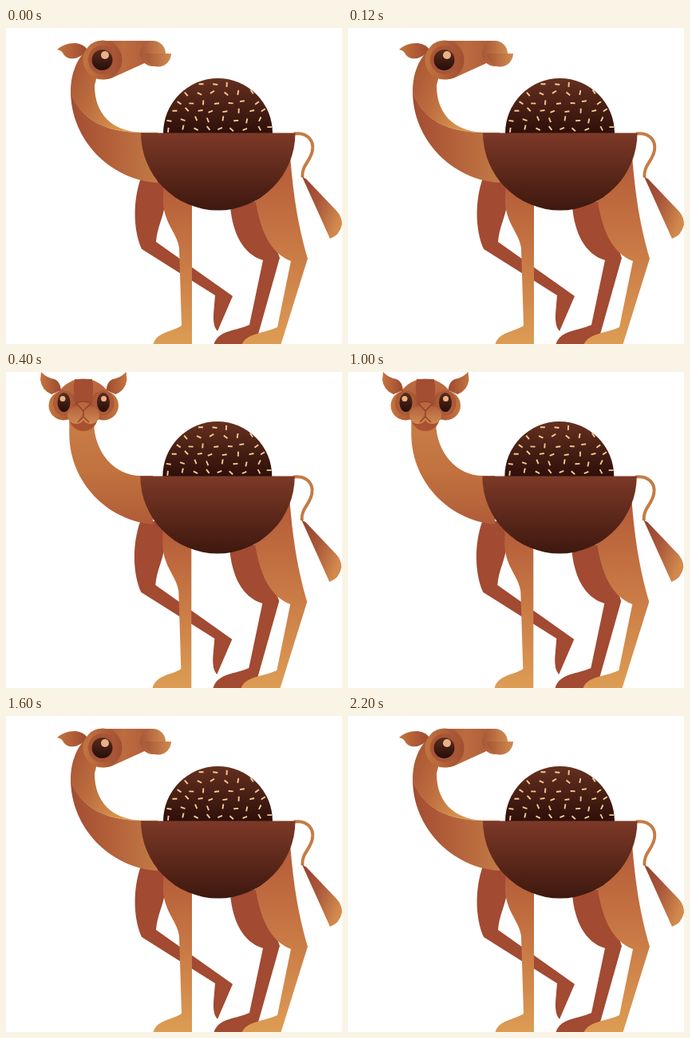
An HTML page that plays this animation: 421x396 px, repeating every 2.6 s.

```html
<!DOCTYPE html>
<html lang="en">
<head>
<meta charset="utf-8">
<title>Camel</title>
<style>
  html, body { margin: 0; width: 100%; height: 100%; overflow: hidden; background: #fff; }
  svg { display: block; width: 100vw; height: 100vh; }
</style>
</head>
<body>
<svg viewBox="0 0 421 396">
  <defs id="defs">
    <g id="side">
      <path fill="url(#ear)" d="M64 27Q74 18 88 19Q97 20 102 27Q93 40 79 38Q73 36 71 31Q69 28 64 27Z"/>
      <path fill="url(#snout)" d="M121 16H184L178 42L132 63Q121 66 110 62Z"/>
      <circle cx="121" cy="40" r="24.500" fill="url(#ring)"/>
      <circle cx="121" cy="40" r="18" fill="#a65636"/>
      <circle cx="184" cy="32" r="16" fill="url(#lip)"/>
      <path fill="url(#lip)" d="M174 32H207A16.500 16.500 0 0 1 174 32Z"/>
      <circle cx="120.500" cy="40" r="13" fill="url(#pupil)"/>
      <circle cx="124" cy="34" r="5" fill="#e9b285"/>
    </g>
    <g id="half">
      <path fill="url(#ear)" d="M44 0Q52 8 61 9Q68 12 69 23L57 28Q45 23 43 10Z"/>
      <circle cx="72" cy="42" r="18.500" fill="url(#ring)"/>
      <ellipse cx="72" cy="39" rx="13" ry="15.500" fill="#ab5a37"/>
      <ellipse cx="72.500" cy="38" rx="8" ry="12" fill="url(#pupil)"/>
    </g>
  </defs>

  <g id="body">
    <path fill="#a24a32" d="M169 188C159 216 159 252 170 277L262 335L260 358Q259 374 265 380L284 336L188 268C189 250 198 236 199 220V188Z"/>
    <path fill="#a24a32" d="M281 224C284 256 296 283 322 291L305 372C288 380 265 378 260 398H312L343 288Q330 255 322 215Z"/>
    <path fill="url(#leg)" d="M197 190V220C199 246 215 258 217 276L220 373C209 381 188 380 184 398H233V190Z"/>
    <path fill="url(#leg)" d="M312 212C318 252 330 282 357 292L340 375C323 383 300 382 295 398H344L378 289C366 248 360 210 356 160Z"/>
    <path fill="none" stroke="#c47c45" stroke-width="4" d="M361 132.500C378 130 386 142 384 153C382 167 370 172 371.500 187"/>
    <path fill="url(#tail)" d="M369.500 183Q371 187 376 189L415 230Q421 237 421 246Q418 260 406 264Z"/>
    <path id="straight" fill="url(#neck)" d="M80 55V80C81 140 128 187 185 192V131H169A58 66 0 0 1 111 65V55Z"/>
    <g id="bent">
      <path fill="url(#bend)" d="M81 79C81 140 130 190 190 194V131H169C128 131 92 116 81 79Z"/>
      <path fill="url(#arch)" d="M131 16C100 16 81 45 81 80C92 116 128 131 169 131C132 129 111 107 111 72L114 60L131 40Z"/>
    </g>
    <path fill="url(#dome)" d="M197 132A68.500 69 0 0 1 334 132Z"/>
    <path id="sprinkles" fill="none" stroke="#f5c892" stroke-width="1.900"/>
    <path fill="url(#bowl)" d="M169 131.500H362.500A96.750 97 0 0 1 169 131.500Z"/>
  </g>

  <use id="right" href="#side"/>
  <use id="left" href="#side" transform="matrix(-1 0 0 1 207.500 0)"/>
  <g id="front">
    <path fill="url(#brow)" d="M66 25Q78 8.500 97 8.500T128 25L116 60H78Z"/>
    <use href="#half"/>
    <use href="#half" transform="matrix(-1 0 0 1 194.500 0)"/>
    <path fill="#a34d33" d="M86 9H108Q111 24 106 40L97 50L88 40Q83 24 86 9Z"/>
    <circle cx="97" cy="56" r="18" fill="#a8522f"/>
    <circle cx="88" cy="54" r="11" fill="url(#cheek)"/>
    <circle cx="106" cy="54" r="11" fill="url(#cheek)"/>
    <path fill="#b8693f" stroke="#954429" stroke-width="1.500" d="M88 39Q97 35 106 39L97 49ZM97 49V56L90 63M97 56L104 63"/>
    <circle cx="71" cy="33.500" r="3.500" fill="#e9b285"/>
    <circle cx="122.500" cy="33.500" r="3.500" fill="#e9b285"/>
  </g>
</svg>
<script>
const el = id => document.getElementById(id);

function gradient(id, dir, ...colors) {
  const stops = colors.map((c, i) => `<stop offset="${i / (colors.length - 1)}" stop-color="${c}"/>`);
  el('defs').insertAdjacentHTML('beforeend',
    `<linearGradient id="${id}" ${dir}>${stops.join('')}</linearGradient>`);
}
const down = 'x2="0" y2="1"', across = 'x2="1"', slant = 'x2="1" y2=".6"';
gradient('bowl', down, '#7c3927', '#3e180f');
gradient('dome', down, '#65301f', '#2d0f0a');
gradient('pupil', down, '#5c2b1c', '#250e0a');
gradient('leg', down, '#b35a38', '#c97a45', '#dd9d54');
gradient('neck', down, '#c87d48', '#c2733f', '#b05c38');
gradient('brow', down, '#bd6c40', '#a85635');
gradient('cheek', down, '#b3623b', '#d08a52');
gradient('tail', slant, '#8f402c', '#a9573a', '#d28a4c');
gradient('arch', slant, '#a34d32', '#bd6d3e', '#dc9d52');
gradient('bend', across, '#a34d32', '#b4623a', '#c27a45');
gradient('snout', across, '#9c4c30', '#bd6c40', '#ab5b38');
gradient('lip', across, '#a65636', '#d08a50');
gradient('ring', across, '#c4743f', '#a04e31');
gradient('ear', across, '#c4743f', '#9c4a30');

// Jittered rows of sprinkles inside the dome
let seed = 11;
const rand = () => (seed = seed * 16807 % 2147483647) / 2147483647;
let dashes = '';
for (let y = 71; y < 130; y += 11) {
  const half = Math.sqrt(66 ** 2 - (132 - y) ** 2);
  for (let x = 268 - half; x < 265 + half; x += 16) {
    const a = rand() * Math.PI, dx = 3 * Math.cos(a), dy = 3 * Math.sin(a);
    dashes += `M${x + rand() * 4 - dx} ${y + rand() * 4 - 2 - dy}l${2 * dx} ${2 * dy}`;
  }
}
el('sprinkles').setAttribute('d', dashes);

const show = (id, on) => { el(id).style.display = on ? '' : 'none'; };

function poseAt(t) {
  if (t < 200 || t >= 1600) return 'right';
  return t < 400 || t >= 1400 ? 'left' : 'front';
}

function draw(now) {
  const pose = poseAt(now % 2600);
  for (const id of ['right', 'left', 'front']) show(id, id === pose);
  show('bent', pose === 'right');
  show('straight', pose !== 'right');
  el('body').setAttribute('transform', pose === 'front' ? 'translate(-.7 -1)' : '');
}

const start = performance.now();
function tick() {
  draw(performance.now() - start);
  requestAnimationFrame(tick);
}
tick();
</script>
</body>
</html>
```
